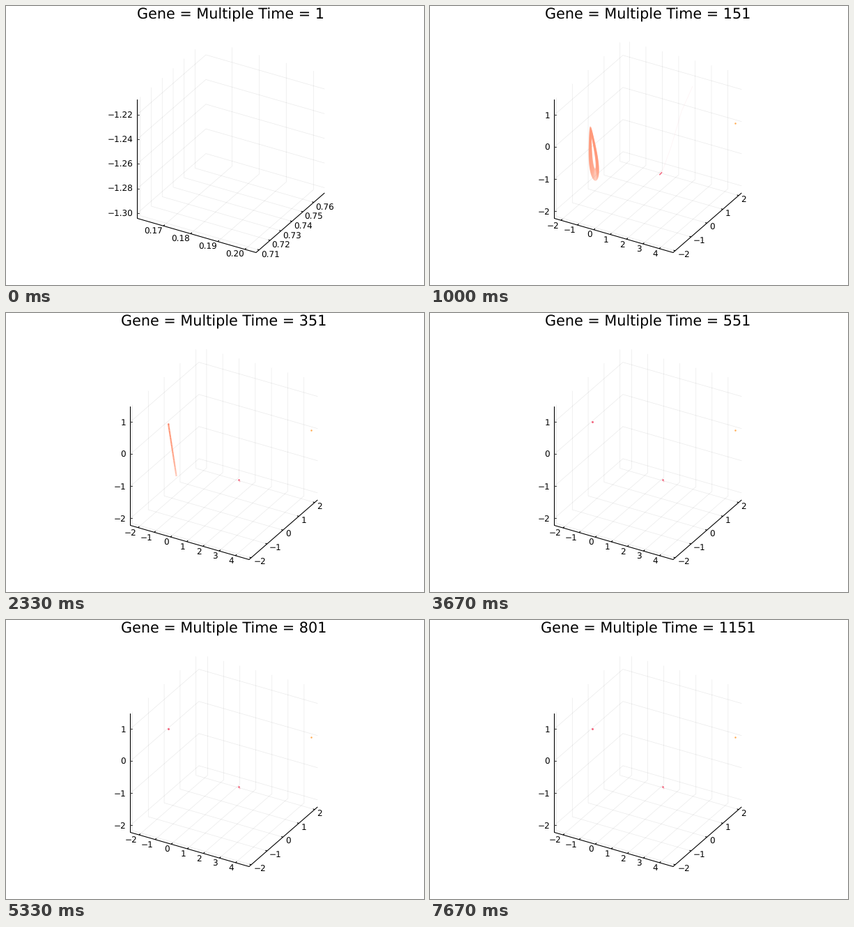
These frames come from a looping animation (600x400 px, 8 s). A matplotlib script:

```python
import numpy as np
import matplotlib.pyplot as plt
from matplotlib.animation import ArtistAnimation
from matplotlib.collections import LineCollection

plt.rcParams["font.family"] = "DejaVu Sans"
plt.rcParams["text.hinting"] = "none"

W, H, DPI = 600, 400, 100
STEPS, LOOP_MS, TICK_MS = 24, 8000, 40
LEAD_MS = 27  # steps start on the tick at or just before their time
PX = 72 / DPI
SALMON, PINK, ORANGE = "#ff9878", "#f4607a", "#ffad55"

# Screen vectors of the three box edges
EX, EY, EZ = np.array([[170.4, 49.0], [98.4, -85.5], [0.0, -170.4]])

fig = plt.figure(figsize=(W / DPI, H / DPI), dpi=DPI, facecolor="white")
ax = fig.add_axes([0, 0, 1, 1])
ax.set(xlim=(0, W), ylim=(H, 0), autoscale_on=False)
ax.axis("off")


def lines(segments, color, width, alpha=1):
    ax.add_collection(LineCollection(segments, colors=color, alpha=alpha,
                                     linewidths=width * PX), autolim=False)


def dot(x, y, size, color, alpha=1):
    ax.scatter([x], [y], s=(size * PX) ** 2, color=color, alpha=alpha,
               linewidths=0, zorder=4)


def label(point, offset, value, digits, ha):
    text = f"{value:.{digits}f}".replace("-", "\u2212")
    ax.text(*(point + offset), text, fontsize=12 * PX, ha=ha, va="baseline")


def draw_box(origin, ranges, ticks, digits, x_offset, y_offset):
    """Draw grid, axes, tick marks and labels of the 3D box."""
    fracs = [(np.array(t) - lo) / (hi - lo) for t, (lo, hi) in zip(ticks, ranges)]
    toward_x, toward_y = (e / np.hypot(*e) * 2.5 for e in (EX, EY))
    grid, marks = [], []
    for f, v in zip(fracs[0], ticks[0]):
        p = origin + f * EX
        grid.append([p, p + EY, p + EY + EZ])
        marks.append([p, p + toward_y])
        label(p, x_offset, v, digits, "right")
    for f, v in zip(fracs[1], ticks[1]):
        p = origin + f * EY
        q = p + EX
        grid.append([q, p, p + EZ])
        marks.append([q, q - toward_x])
        label(q, y_offset, v, digits, "left")
    for f, v in zip(fracs[2], ticks[2]):
        p = origin + f * EZ
        grid.append([p, p + EY, p + EY + EX])
        marks.append([p, p + [2.5, 0]])
        label(p, (-6.2, 4.4), v, digits, "right")
    lines(grid, "black", 0.8, 0.075)
    lines([[origin + EZ, origin, origin + EX, origin + EX + EY]], "black", 1.1)
    lines(marks, "black", 1.1)


def draw_title(center, time):
    ax.text(center, 19, f"Gene = Multiple Time = {time}", fontsize=20.75 * PX,
            ha="center", va="baseline")


def mix(a, b, u):
    return np.array(a) * (1 - u) + np.array(b) * u


def teardrop(top, bottom, half_width):
    a = np.linspace(0, 2 * np.pi, 90)
    s = (1 - np.cos(a)) / 2
    path = np.outer(1 - s, top) + np.outer(s, bottom)
    path[:, 0] += half_width * np.sin(a) * (0.4 + 1.2 * s)
    return path


def draw_cycle(k):
    """Nested loops that flatten into a slanted stroke."""
    u = min(max((k - 3) / 4, 0), 1) ** 0.8
    loops = []
    for n in np.linspace(0, 1, 16):
        top = mix(mix((230.2, 173), (231.5, 185), n), (233, 158), u)
        bottom = mix(mix((237.5, 250), (237, 234), n), (244.3, 233), u)
        width = mix(mix(5.7, 2.0, n), 0.3, u)
        loops.append(teardrop(top, bottom, width))
    lines(loops, SALMON, 1.1, 0.5)


def draw_stroke(k):
    """Fading stroke that draws back into its upper end."""
    length = max(0, 1 - (k - 7) / 4) ** 1.5
    if length:
        s = np.linspace(0, length, 31)
        pts = np.outer(1 - s, (233, 158.5)) + np.outer(s, (244.6, 234))
        for i in range(30):
            lines([pts[i:i + 2]], SALMON, 2.2, 1 - 0.55 * (i / 30) ** 3)
    if k > 7:
        dot(233.4, 156.2, 3, PINK, 0.95)
    else:
        dot(233.2, 159.2, 2, "#f58070", 0.9)


def draw_points(k):
    dot(437.8, 167.9, 2.5, ORANGE)
    if k <= 3:
        lines([[(329.3, 242.2), (331.5, 240), (333, 238.2)]], PINK, 1.6, 0.9)
        lines([[(333, 238), (346, 202), (361, 151), (377, 115)]], PINK, 0.8,
              0.07 if k == 3 else 0.2)
    else:
        dot(333.5, 238.5, 2.6, PINK)
        dot(335.2, 240.8, 2, PINK, 0.35)


def draw_start():
    start = (304, 221)
    for end, bend, color in (((235, 250), -14, SALMON), ((437.8, 167.9), -20, ORANGE),
                             ((331.5, 240), 8, PINK)):
        s = np.linspace(0, 1, 40)
        path = np.outer(1 - s, start) + np.outer(s, end)
        path[:, 1] += bend * np.sin(np.pi * s)
        lines([path], color, 0.9, 0.35)


def x_minimum(k):
    return np.interp(k, [5, 6, 7, 8, 9], [-2.404, -2.425, -2.472, -2.525, -2.541])


def draw(k):
    if k == 0:
        draw_box(np.array([188.5, 304.5]),
                 [(0.1604, 0.2041), (0.7072, 0.7699), (-1.3042, -1.2079)],
                 [np.arange(17, 21) / 100, np.arange(71, 77) / 100,
                  np.arange(-130, -121, 2) / 100], 2, (-0.7, 11.4), (2.6, 11))
        draw_title(322.9, 1)
        return
    draw_box(np.array([178.5, 304.5]),
             [(x_minimum(k), 4.843), (-2.134, 2.186), (-2.22, 1.478)],
             [range(-2, 5), range(-2, 3), range(-2, 2)], 0, (-2.3, 11.4), (3.5, 9.4))
    if k == 1:
        draw_start()
    if k < 7:
        draw_cycle(k)
    else:
        draw_stroke(k)
    draw_points(k)
    draw_title(312.8, 1 + 50 * k)


def build_scene(k):
    """Draw one step and return only the artists it added."""
    n_shapes, n_texts = len(ax.collections), len(ax.texts)
    draw(k)
    return [*ax.collections[n_shapes:], *ax.texts[n_texts:]]


scenes = [build_scene(k) for k in range(STEPS)]
schedule = [scenes[int((t + LEAD_MS) * STEPS // LOOP_MS)]
            for t in range(0, LOOP_MS, TICK_MS)]
anim = ArtistAnimation(fig, schedule, interval=TICK_MS, repeat=True, repeat_delay=0)
plt.show()
```
